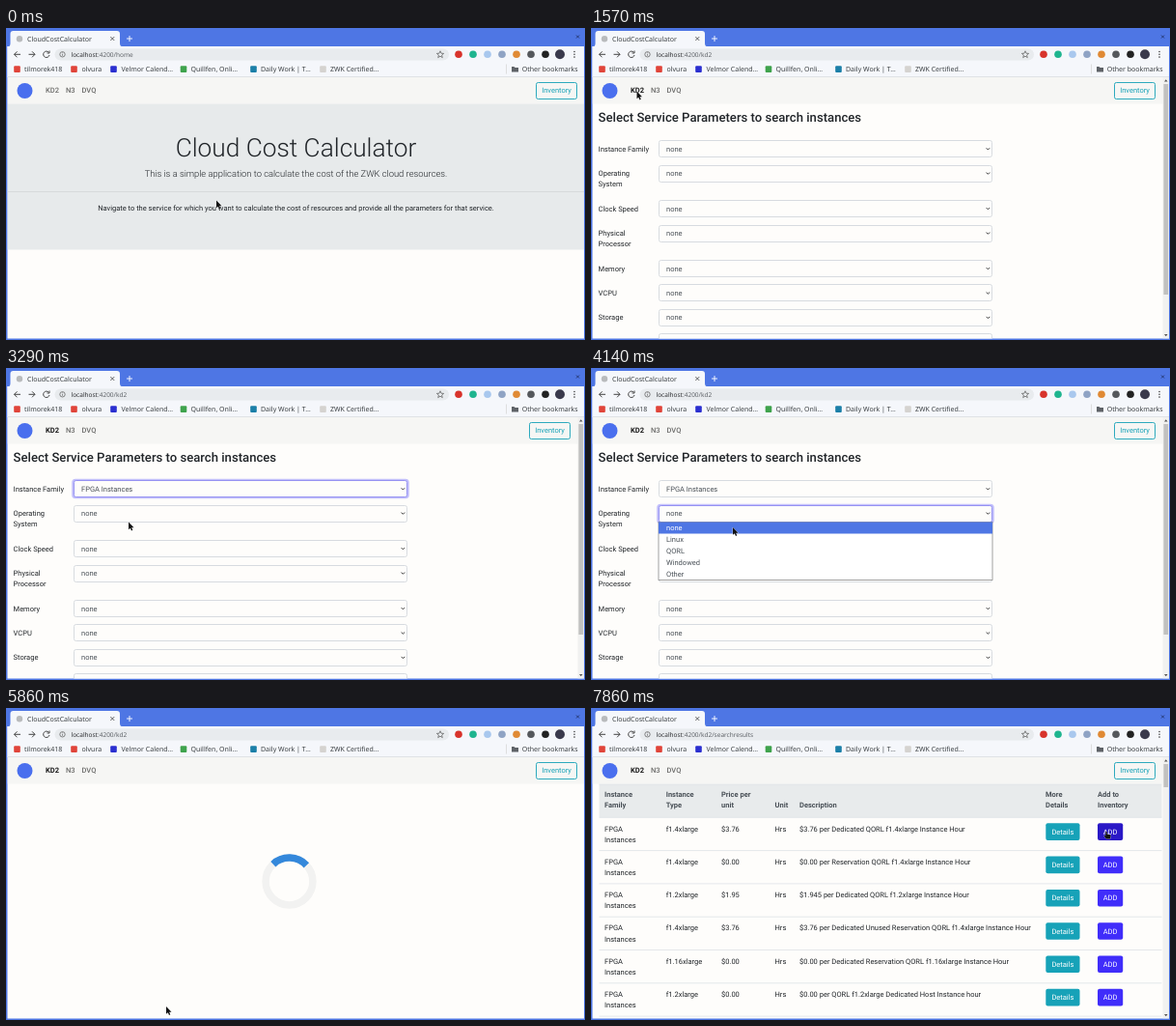
An HTML page that plays this animation: 600 px wide and 323 px high, repeating every 8000 ms.

```html
<!DOCTYPE html>
<html lang="en">
<head>
<meta charset="utf-8">
<title>CloudCostCalculator</title>
<style>
  html, body { margin: 0; height: 100%; overflow: hidden; background: #fefdfb; }
  svg { display: block; width: 100vw; height: 100vh; }
  text { font: 7.5px Roboto, sans-serif; fill: #212529; white-space: pre; text-rendering: geometricPrecision; }
  .ui { font: 7px "Noto Sans", sans-serif; fill: #3c4043; }
  .url { font: 6.5px "Noto Sans", sans-serif; fill: #5f6368; }
  .nav { font-weight: 500; fill: #6c6c6a; }
  .on { font-weight: 700; fill: #1a1a1a; }
  .bold { font-weight: 700; fill: #495057; }
  .title { font-size: 26.25px; font-weight: 300; }
  .lead { font-size: 9.375px; font-weight: 300; }
  .h3 { font-size: 13.125px; font-weight: 500; }
  .val { fill: #495057; }
  .teal { fill: #17a2b8; }
  .white { fill: #fff; }
  .mid { text-anchor: middle; }
</style>
</head>
<body>
<svg id="stage" viewBox="0 0 600 323" preserveAspectRatio="none"></svg>
<script>
const LOOP = 8000, STEPS_PER_SECOND = 7;
const BLUE = '#4e76e4', TEAL = '#17a2b8', PAGE = '#fefdfb', TOOLBAR = '#f5f7fb';

// Steps at which the interface changes
const FORM = 11, OPEN1 = 18, PICK1 = 21, OPEN2 = 28, PICK2 = 33,
      SCROLL = 36, LOADING = 41, RESULTS = 46, HOVER_ADD = 54;

// Pointer path: step, x, y
const PATH = [
  [0, 218, 178.5], [2, 218, 178.5], [7, 58, 69.5], [10, 47, 65], [12, 48, 66],
  [16, 113, 124], [18, 113, 124], [19, 126, 159], [23, 127, 159.5], [28, 145, 151],
  [29, 147, 165], [30, 150, 178], [31, 152, 190], [33, 152, 190], [35, 154.5, 200.5],
  [40, 166, 309], [46, 166, 309], [48, 172, 297], [54, 530, 129], [55, 533, 127.5]
];

const FAMILIES = ['none', 'Compute optimized', 'FPGA Instances', 'General purpose',
                  'GPU instance', 'Memory optimized', 'Storage optimized'];
const SYSTEMS = ['none', 'Linux', 'QORL', 'Windowed', 'Other'];

const ROWS = [
  ['f1.4xlarge', '$3.76', '$3.76 per Dedicated QORL f1.4xlarge Instance Hour'],
  ['f1.4xlarge', '$0.00', '$0.00 per Reservation QORL f1.4xlarge Instance Hour'],
  ['f1.2xlarge', '$1.95', '$1.945 per Dedicated QORL f1.2xlarge Instance Hour'],
  ['f1.4xlarge', '$3.76', '$3.76 per Dedicated Unused Reservation QORL f1.4xlarge Instance Hour'],
  ['f1.16xlarge', '$0.00', '$0.00 per Dedicated Reservation QORL f1.16xlarge Instance Hour'],
  ['f1.2xlarge', '$0.00', '$0.00 per QORL f1.2xlarge Dedicated Host Instance hour']
];

const text = (x, y, s, cls = '') => `<text x="${x}" y="${y}" class="${cls}">${s}</text>`;
const rect = (x, y, w, h, fill, rx = 0, more = '') =>
  `<rect x="${x}" y="${y}" width="${w}" height="${h}" fill="${fill}" rx="${rx}" ${more}/>`;
const disc = (x, y, r, fill, more = '') => `<circle cx="${x}" cy="${y}" r="${r}" fill="${fill}" ${more}/>`;
const line = (d, color, width = 1) =>
  `<path d="${d}" fill="none" stroke="${color}" stroke-width="${width}"/>`;
const border = (color, width = .8) => `stroke="${color}" stroke-width="${width}"`;

function pointerAt(n) {
  const i = Math.max(1, PATH.findIndex(p => p[0] >= n));
  const [n0, x0, y0] = PATH[i - 1], [n1, x1, y1] = PATH[i];
  const k = (n - n0) / (n1 - n0), e = k * k * (3 - 2 * k);
  return [x0 + (x1 - x0) * e, y0 + (y1 - y0) * e];
}

function browser(path) {
  const bookmarks = [
    [11.5, 19, '#e0443a', 'tilmorek418'], [70.5, 78.5, '#e0443a', 'olvura'],
    [111.5, 119.5, '#2b2fd0', 'Velmor Calend…'], [184, 191.5, '#3fa34d', 'Quillfen, Onli…'],
    [256.5, 264, '#1b7fa8', 'Daily Work | T…'], [328.5, 336, '#d5d3d0', 'ZWK Certified…']
  ];
  const extensions = ['#d8342c', '#1fb58f', '#a9c8ee', '#8fa3c4', '#e08a35', '#55585c', '#222'];
  return rect(0, 0, 600, 323, BLUE) + rect(1.5, 19, 597.5, 302.5, PAGE) + rect(1.5, 19, 597.5, 32, TOOLBAR)
    + `<path d="M2 19.5Q4.5 19 4.5 16V6Q4.5 3 7.5 3H115Q118 3 118 6V16Q118 19 121 19.5Z" fill="${TOOLBAR}"/>`
    + line('M1.5 50.5H599', '#dfe2e6')
    + disc(14, 11.2, 3.2, '#b9bbbd') + text(22, 13.5, 'CloudCostCalculator', 'ui')
    + line('M108.3 9l4 4m0-4l-4 4', '#444', .8)
    + line('M125 11h6m-3-3v6', '#fff', .9)
    + line('M591 7.5l3 3m0-3l-3 3', '#1d2c5c', .8)
    + line('M15 27.3H8.5m3-3l-3 3 3 3', '#444')
    + line('M23.5 27.3H30m-3-3l3 3-3 3', '#444')
    + line('M44.3 25.2A3.2 3.2 0 1 0 45 28M45 23.5V26H42.5', '#444')
    + rect(50.5, 21.5, 408.5, 12, '#e8ebee', 6)
    + disc(58.5, 27.3, 2.7, 'none', border('#666')) + line('M58.5 26.8v2M58.5 25.4v.7', '#666', .7)
    + text(67.5, 29.7, `<tspan fill="#303134">localhost</tspan>:4200/${path}`, 'url')
    + line('M450 23.8l1 2.4 2.6.2-2 1.7.7 2.5-2.3-1.4-2.3 1.4.7-2.5-2-1.7 2.6-.2z', '#555', .7)
    + extensions.map((c, i) => disc(469 + 15 * i, 27.3, 3.8, c)).join('')
    + disc(574, 27.3, 5, '#3a3a4c')
    + [24.5, 27.3, 30.1].map(y => disc(589, y, .8, '#444')).join('')
    + bookmarks.map(([ix, x, c, s]) => rect(ix - 3.3, 39.3, 6.6, 6.6, c, 1) + text(x, 45, s, 'ui')).join('')
    + line('M518.5 37.5v10', '#d3d3d1', .7)
    + '<path d="M524 40h2.5l1 1H531v4.5h-7z" fill="#5f6368"/>' + text(534.7, 45, 'Other bookmarks', 'ui');
}

function navbar(n, shift) {
  const active = n >= 8 ? 0 : n >= 5 ? 1 : -1;
  return rect(1.5, 51, 597.5, 27.5, '#f6f6f4') + disc(19.5, 65, 8, '#4a6fee')
    + [[41, 'KD2'], [62, 'N3'], [78.5, 'DVQ']]
      .map(([x, s], i) => text(x, 67.3, s, i === active ? 'nav on' : 'nav')).join('')
    + rect(549.5 - shift, 56.5, 42, 17, 'none', 1.9, border(TEAL, .9))
    + text(570.5 - shift, 67.3, 'Inventory', 'teal mid');
}

function scrollbar(y, height) {
  return rect(592.5, 51, 6.5, 270.5, '#f1f1f0') + rect(593.4, y, 4.7, height, '#c1c1c0')
    + '<path d="M594 55.5h3.6l-1.8-2.2zM594 317h3.6l-1.8 2.2z" fill="#555"/>';
}

function home() {
  return rect(1.5, 78.5, 597.5, 151, '#e7eaeb')
    + text(300.5, 133, 'Cloud Cost Calculator', 'title mid')
    + text(300.5, 154, 'This is a simple application to calculate the cost of the ZWK cloud resources.', 'lead mid')
    + line('M1.5 169.5H599', '#d3d6d7', .8)
    + text(300.5, 188.5, 'Navigate to the service for which you want to calculate the cost of resources and provide all the parameters for that service.', 'mid');
}

function select(y, value, focused) {
  const top = Math.round(y - 9) + .5;
  const ring = focused ? rect(69.5, top - .5, 347, 18, 'none', 2.5, border('#c3c0fb', 2.6)) : '';
  return ring + rect(70.5, top, 345, 17, PAGE, 2, border(focused ? '#8580f0' : '#ced4da'))
    + text(78, y + 2.6, value, 'val') + line(`M409.7 ${y - .9}l1.7 1.7 1.7-1.7`, '#333');
}

function dropdown(top, items, pointerY) {
  const hot = Math.max(0, Math.floor((pointerY - top) / 12));
  return rect(70, top, 346, items.length * 12, '#fff', 0, border('#8a8a8a'))
    + items.map((s, i) => (i === hot ? rect(70, top + 12 * i, 346, 12, BLUE) : '')
      + text(78, top + 12 * i + 8.6, s, i === hot ? 'white' : 'val')).join('');
}

function form(n, pointerY) {
  const fields = [
    [125.2, 'Instance Family'], [150.5, 'Operating', 'System'], [187, 'Clock Speed'],
    [212.5, 'Physical', 'Processor'], [249, 'Memory'], [274.4, 'VCPU'], [299.8, 'Storage'], [325.3, 'Network']
  ];
  const values = [FAMILIES[n >= PICK1 ? 2 : 0], SYSTEMS[n >= PICK2 ? 2 : 0]];
  const focus = n >= OPEN2 ? 1 : n >= OPEN1 ? 0 : -1;
  let out = text(7.6, 96.6, 'Select Service Parameters to search instances', 'h3');
  fields.forEach(([y, first, second = ''], i) => {
    out += text(7.6, y + 2.6, first) + text(7.6, y + 13.8, second) + select(y, values[i] || 'none', i === focus);
  });
  out += rect(146, 347, 40, 17.4, '#402dfa', 2) + text(166, 358.3, 'Search', 'white mid');
  if (n >= OPEN1 && n < PICK1) out += dropdown(134, FAMILIES, pointerY);
  if (n >= OPEN2 && n < PICK2) out += dropdown(159.5, SYSTEMS, pointerY);
  return out;
}

function spinner(n) {
  const ring = disc(293.5, 179.5, 24.4, 'none', border('#f2f2f1', 7.5));
  const arc = line('M276.25 162.25A24.4 24.4 0 0 1 310.75 162.25', '#3488db', 7.5);
  const angle = (n - LOADING) / STEPS_PER_SECOND * 180 + 2;
  return ring + `<g transform="rotate(${angle} 293.5 179.5)">${arc}</g>`;
}

function results(n) {
  const heads = [[14, 'Instance', 'Family'], [77.7, 'Instance', 'Type'], [135, 'Price per', 'unit'], [190.5, '', 'Unit'],
                 [216, '', 'Description'], [471, 'More', 'Details'], [525, 'Add to', 'Inventory']];
  const rule = y => line(`M8.5 ${y}H591.5`, '#dee2e6', .8);
  let out = rect(8.5, 79, 583, 34.3, '#e8ebec') + rule(79) + rule(113.3)
    + heads.map(([x, a, b]) => text(x, 92, a, 'bold') + text(x, 103.2, b, 'bold')).join('');
  ROWS.forEach(([type, price, description], i) => {
    const y = 34.3 * i, hot = i === 0 && n >= HOVER_ADD;
    out += text(14, y + 127.5, 'FPGA') + text(14, y + 138.7, 'Instances')
      + text(77.7, y + 127.5, type) + text(135, y + 127.5, price)
      + text(190.5, y + 127.5, 'Hrs') + text(216, y + 127.5, description)
      + rect(471.3, y + 119.3, 35.2, 17.6, TEAL, 2) + text(488.9, y + 130.7, 'Details', 'white mid')
      + rect(525, y + 119.3, 26.2, 17.6, hot ? '#2a18c6' : '#402dfa', 2) + text(538.1, y + 130.7, 'ADD', 'white mid')
      + rule(y + 147.6);
  });
  return out;
}

function pointer(n, x, y) {
  const hand = (n >= 6 && n < FORM) || n >= HOVER_ADD;
  const shape = hand
    ? 'M.3.6Q1.1-.3 1.8.6V3L5 3.8Q5.8 4 5.6 5L5 8H1L-1.5 4.8Q-1.2 3.8.3 4.8Z'
    : 'M0 0V7.8L1.8 6.2 3 8.9 4.3 8.3 3.1 5.7H5.5Z';
  return `<path transform="translate(${x} ${y})" d="${shape}" fill="#111" stroke="#fff" stroke-width=".5" paint-order="stroke"/>`;
}

function scene(n) {
  const [x, y] = pointerAt(n);
  const isForm = n >= FORM && n < LOADING, isResults = n >= RESULTS;
  const path = isResults ? 'kd2/searchresults' : n >= FORM ? 'kd2' : 'home';
  const page = isResults ? results(n) : n >= LOADING ? spinner(n) : isForm ? form(n, y) : home();
  const scroll = isForm ? 50 * Math.min(1, Math.max(0, (n - SCROLL) / 3)) : 0;
  const bar = isResults ? scrollbar(58, 24) : isForm ? scrollbar(58 + scroll * .8, 218) : '';
  return '<clipPath id="view"><rect x="1.5" y="51" width="597.5" height="270.5"/></clipPath>'
    + browser(path)
    + `<g clip-path="url(#view)"><g transform="translate(0 ${-scroll})">${navbar(n, bar ? 7 : 0)}${page}</g>${bar}</g>`
    + pointer(n, x, y);
}

const stage = document.getElementById('stage');
let shown = -1;
function tick() {
  const t = performance.now() % LOOP;
  const n = Math.min(55, Math.floor((t + 3) * STEPS_PER_SECOND / 1000));
  if (n !== shown) stage.innerHTML = scene(shown = n);
  requestAnimationFrame(tick);
}
tick();
</script>
</body>
</html>
```
